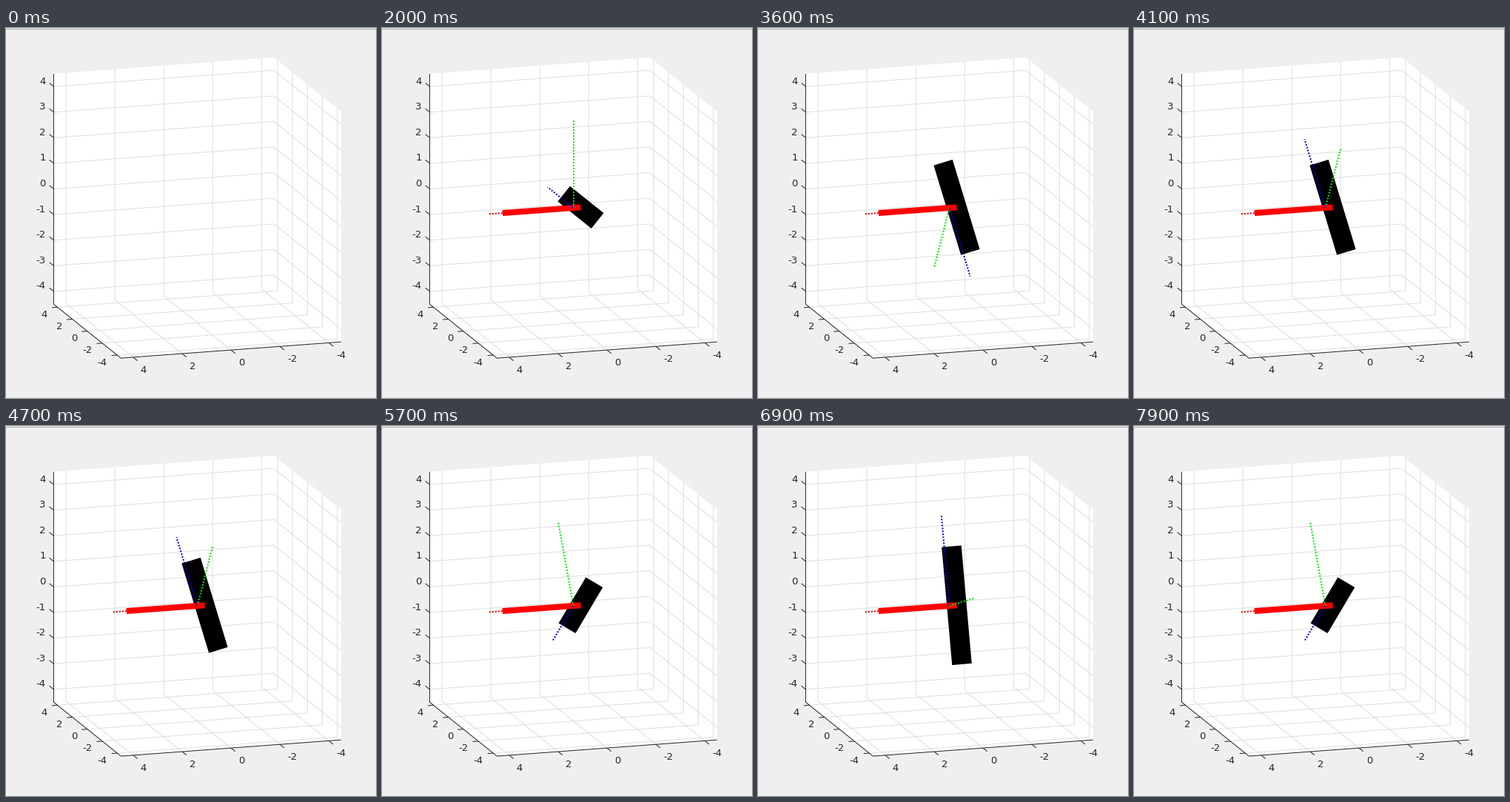
Recreate the animation shown at these times as a matplotlib script. Size 500x500 px, loop 8000 ms.

```python
import numpy as np
import matplotlib.pyplot as plt
from matplotlib.animation import FuncAnimation

SIZE, DPI = 500, 100
PX = 72 / DPI                      # one pixel in points
FRAMES, INTERVAL = 80, 100
LIM = 4.5
DARK = "#262626"

CENTER = np.array([258.1, 242.5])
BASIS = np.array([[-33.05, 2.44], [-10.1, -8.1], [0, -34.6]])

ARM = 3.45                         # dotted axis length
HUB = -0.3                         # rotor plane along the shaft
RADIUS = 2.25
APPEAR, SPIN, LEG = 3, 25, 11      # frame counts
# start of each spin leg and its two closing poses, in tenths of a turn
LEGS = [(2, 8, 8), (6, 6, 6), (1, 1, 9), (8, 8, 7), (2, 2, 9)]


def project(*points):
    return CENTER + np.array(points, float) @ BASIS


def tenths(frame):
    if frame < SPIN:
        return 0
    leg, step = divmod(frame - SPIN, LEG)
    start, *closing = LEGS[leg]
    return start + step if step < 9 else closing[step - 9]


fig = plt.figure(figsize=(SIZE / DPI, SIZE / DPI), dpi=DPI, facecolor="#efefef")
ax = fig.add_axes([0, 0, 1, 1])
ax.set_xlim(-0.5, SIZE - 0.5)
ax.set_ylim(SIZE - 0.5, -0.5)
ax.axis("off")


def draw(points, color, width, z, **style):
    x, y = np.transpose(points)
    return ax.plot(x, y, color=color, lw=width * PX, zorder=z,
                   solid_capstyle="butt", **style)[0]


def grid(*points):
    draw(project(*points), "#dedede", 1, 2)


def tick(point, direction, length, offset, value, align):
    x, y = project(point)[0]
    d = np.array(direction, float) @ BASIS
    d *= length / np.hypot(*d)
    draw([(x, y), (x + d[0], y + d[1])], DARK, 1, 3)
    ax.text(x + offset[0], y + offset[1], str(value), color=DARK, ha=align,
            va="center", family="DejaVu Sans", fontsize=13.2 * PX)


def draw_box():
    L = LIM
    walls = project((L, L, L), (-L, L, L), (-L, -L, L),
                    (-L, -L, -L), (L, -L, -L), (L, L, -L))
    ax.fill(*walls.T, color="white", lw=0, zorder=1)
    for v in range(-4, 5, 2):
        grid((v, L, L), (v, L, -L), (v, -L, -L))
        grid((-L, v, L), (-L, v, -L), (L, v, -L))
        tick((v, -L, -L), (0, -1, 0), 7.5, (10, 17.5), v, "left")
        tick((L, v, -L), (1, 0, 0), 7.5, (-13.5, 10), v, "right")
    for v in range(-4, 5):
        grid((L, L, v), (-L, L, v), (-L, -L, v))
        tick((L, L, v), (0, 1, 0), 7.5, (-10.5, -7), v, "right")
    draw(project((L, L, L), (L, L, -L), (L, -L, -L), (-L, -L, -L)), DARK, 1, 3)
    # window border
    draw([(-0.5, 0), (SIZE - 0.5, 0)], "#a6a6a6", 1, 4)
    draw([(SIZE - 1, 0), (SIZE - 1, SIZE - 0.5)], "#b4b4b4", 1, 4)


draw_box()

origin = (0, 0, 0)
dots = dict(linestyle=(0, (1, 1)), dash_capstyle="butt")
blade = draw(project(origin, origin), "black", 26.6, 5)
shaft = draw(project((HUB, 0, 0), (2.9, 0, 0)), "#ff0000", 8, 6)
x_axis = draw(project(origin, (ARM, 0, 0)), "#f00000", 2, 5.5, **dots)
y_axis = draw(project(origin, origin), "#00e800", 2, 7, **dots)
z_axis = draw(project(origin, origin), "#0000d0", 2, 7, **dots)
parts = [blade, shaft, x_axis, y_axis, z_axis]


def update(frame):
    a = np.radians(36 * tenths(frame))
    c, s = np.cos(a), np.sin(a)
    blade.set_data(*project((HUB, RADIUS * c, RADIUS * s),
                            (HUB, -RADIUS * c, -RADIUS * s)).T)
    y_axis.set_data(*project(origin, (0, -ARM * s, ARM * c)).T)
    z_axis.set_data(*project(origin, (0, ARM * c, ARM * s)).T)
    for part in parts:
        part.set_visible(frame >= APPEAR)
    return parts


anim = FuncAnimation(fig, update, frames=FRAMES, interval=INTERVAL,
                     repeat=True, repeat_delay=0, blit=False)
plt.show()
```
